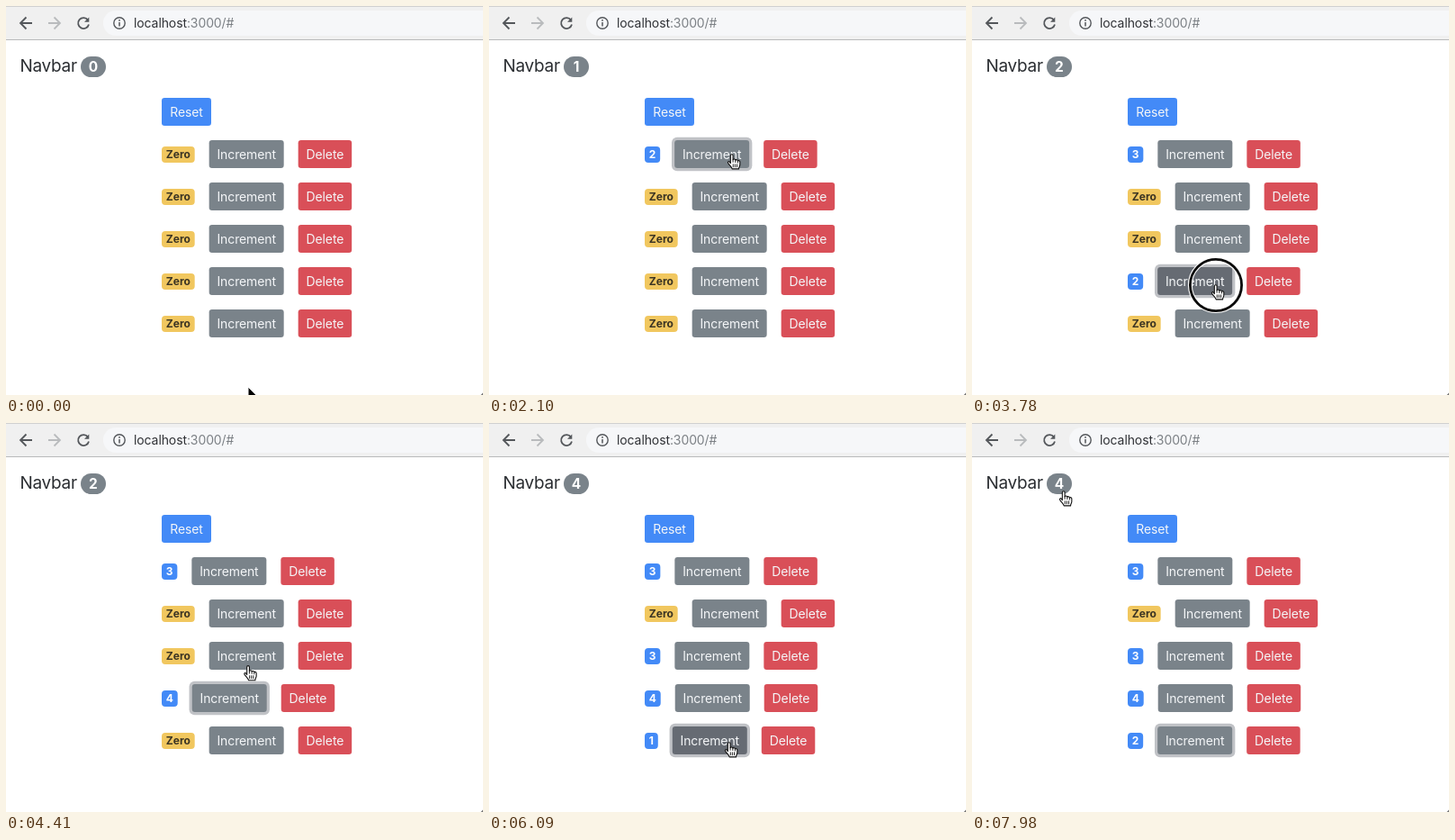
An HTML page that plays this animation: 530x432 px, repeating every 8000 ms.

```html
<!DOCTYPE html>
<html lang="en">
<head>
<meta charset="utf-8">
<title>Counters</title>
<style>
html, body { margin: 0; width: 100%; height: 100%; overflow: hidden; background: #fff; }
svg { display: block; width: 530px; height: 432px; font-family: Inter, Roboto, sans-serif; }
.btn { font-size: 14px; letter-spacing: -.12px; fill: #f4f6f8; text-anchor: middle; }
.tag { font-size: 12px; font-weight: 700; }
</style>
</head>
<body>
<svg viewBox="0 0 530 432">
  <rect width="530" height="432" fill="#fff"/>
  <rect width="530" height="38" fill="#f0f0f0"/>
  <path d="M530 5H122a14 14 0 0 0 0 28H530z" fill="#f6f7f9"/>
  <path d="M0 .5H530" stroke="#d0d0d0"/>
  <path d="M0 37.5H530" stroke="#b9babb"/>
  <g fill="none" stroke="#54575b" stroke-width="1.8">
    <path d="M29 19H16.5M22.5 12.5L16 19l6.5 6.5"/>
    <path d="M47 19H59.5M53.5 12.5L60 19l-6.5 6.5" stroke="#b9bbbd"/>
    <path d="M91 15.5A6 6 0 1 0 92 20.5"/>
    <path d="M92.3 12.5v5.3H87z" fill="#54575b" stroke="none"/>
    <circle cx="126" cy="19" r="6.2" stroke-width="1.4"/>
    <path d="M126 18v4.5M126 15v1.7" stroke-width="1.5"/>
  </g>
  <text x="142" y="24" font-size="14" letter-spacing="-.1" fill="#303236">localhost<tspan fill="#7c8085">:3000/#</tspan></text>
  <text x="15.5" y="73" font-size="19" letter-spacing="-.3" fill="#2a2d31">Navbar</text>
  <rect x="83" y="56" width="28" height="23" rx="11.5" fill="#7a838a"/>
  <text id="total" x="97" y="73" font-size="15.5" font-weight="700" fill="#fff" text-anchor="middle">0</text>
  <g id="page"></g>
  <g id="ring" fill="none">
    <circle r="28.6" stroke="#fff" stroke-width="5"/>
    <circle r="28.6" stroke="#0b0b0b" stroke-width="2.8"/>
  </g>
  <path id="arrow" d="M0 0V14.5L3.4 11.4 5.7 16.8 8.2 15.7 5.9 10.5H10.4z" fill="#000" stroke="#fff" stroke-linejoin="round"/>
  <g id="hand" stroke="#111" stroke-linejoin="round" stroke-linecap="round">
    <g transform="scale(.92)">
      <path d="M-1.8 10.5V1.3C-1.8-.7 1.2-.7 1.2 1.3V6.3C1.6 5 4 5.1 4.2 6.7 4.8 5.7 6.8 6 7 7.5 7.8 6.8 9.6 7.2 9.6 9V12.2C9.6 14 8.2 15 8.2 17.3H.2C0 15.3-2.5 13.5-4.6 10.4-5.6 8.8-3.9 7.6-2.8 9z" fill="#fff" stroke-width="1.2"/>
      <path d="M1.2 6.3V9M4.2 7V9.3M7 7.8V9.8M1.4 11.8V15M3.7 11.8V15M6 11.8V15" fill="none"/>
    </g>
  </g>
  <path d="M530 429.5V432H527.5z" fill="#777"/>
</svg>
<script>
const LOOP = 8000, STEP = 70, LEFT = 173, GAP = 16;
const INC_W = 83, DEL_W = 59.5, BTN_H = 31, RESET = -1;
const GREY = '#7a838a', GREY_DOWN = '#666b73', RED = '#d94f58';
const BLUE = '#438af7', BLUE_DOWN = '#2f70dc', YELLOW = '#f1c75f';

// The pointer travels to each stop, rests, then clicks at a steady beat.
const REST = 90, HOLD = .6, RING_DELAY = 40;
const START = { x: 269, y: 423 };
const STOPS = [
  { row: RESET, x: 200, y: 129, arrive: 540, travel: 540, clicks: 1, beat: 350 },
  { row: 0, x: 270, y: 165, arrive: 1410, travel: 570, clicks: 3, beat: 350 },
  { row: 3, x: 271, y: 310, arrive: 3130, travel: 667, clicks: 4, beat: 235 },
  { row: 2, x: 269, y: 262, arrive: 4530, travel: 400, clicks: 3, beat: 250 },
  { row: 4, x: 267, y: 355, arrive: 5445, travel: 180, clicks: 2, beat: 520 },
  { x: 102, y: 76, arrive: 7760, travel: 1110, clicks: 0 }
];

const $ = id => document.getElementById(id);
const page = $('page');

function make(parent, name, attrs, text = '') {
  const node = document.createElementNS('http://www.w3.org/2000/svg', name);
  set(node, attrs);
  node.textContent = text;
  return parent.appendChild(node);
}
function set(node, attrs) {
  for (const key in attrs) node.setAttribute(key, attrs[key]);
}
const show = (node, on) => set(node, { visibility: on ? 'visible' : 'hidden' });
const move = (node, x, y) => set(node, { transform: `translate(${x} ${y})` });

function button(label, y, width, fill, halo) {
  const g = make(page, 'g', {});
  const glow = make(g, 'rect', { x: -3.2, y: -3.2, width: width + 6.4, height: BTN_H + 6.4, rx: 6, fill: halo });
  const face = make(g, 'rect', { width, height: BTN_H, rx: 3.2, fill });
  make(g, 'text', { class: 'btn', x: width / 2, y: 20.8 }, label);
  const btn = {
    face, glow,
    place(x) { btn.x = x; move(g, x, y); },
    hit: p => inside(p, btn.x, y, width, BTN_H)
  };
  btn.place(LEFT);
  show(glow, false);
  return btn;
}

const reset = button('Reset', 102, 55, BLUE, '#a4c6fb');
const rows = [0, 1, 2, 3, 4].map(i => {
  const y = 149 + 47 * i;
  return {
    box: make(page, 'rect', { x: LEFT, y: y + 7, height: 18, rx: 4 }),
    tag: make(page, 'text', { class: 'tag', x: LEFT + 4.8, y: y + 20.2 }),
    inc: button('Increment', y, INC_W, GREY, '#c0c2c6'),
    del: button('Delete', y, DEL_W, RED, '#eeb0b4')
  };
});

const clamp = u => Math.min(1, Math.max(0, u));
const ease = u => u * u * u * (u * (6 * u - 15) + 10);
const inside = (p, x, y, w, h) => p.x >= x && p.x <= x + w && p.y >= y && p.y <= y + h;

function pointer(t) {
  let { x, y } = START;
  for (const s of STOPS) {
    const k = ease(clamp((t - s.arrive + s.travel) / s.travel));
    x += (s.x - x) * k;
    y += (s.y - y) * k;
  }
  return { x, y };
}

function clicksAt(t) {
  const state = { counts: rows.map(() => 0), focus: null, down: null, ring: false };
  for (const { row, arrive, clicks, beat } of STOPS) {
    for (let i = 0; i < clicks; i++) {
      const since = t - (arrive + REST + i * beat);
      if (since < 0) return state;
      state.focus = row;
      if (since < beat * HOLD) {
        state.down = row;
        state.ring = since >= RING_DELAY;
      } else if (row !== RESET) state.counts[row]++;
    }
  }
  return state;
}

function drawRow({ box, tag, inc, del }, n, focused, pressed) {
  tag.textContent = n || 'Zero';
  const width = tag.getComputedTextLength() + 9.6;
  set(tag, { fill: n ? '#fff' : '#3b3423' });
  set(box, { width, fill: n ? BLUE : YELLOW });
  inc.place(LEFT + width + GAP);
  del.place(inc.x + INC_W + GAP);
  show(inc.glow, focused);
  set(inc.face, { fill: pressed ? GREY_DOWN : GREY });
}

function draw(t) {
  const p = pointer(t), { counts, focus, down, ring } = clicksAt(t);
  show(reset.glow, focus === RESET);
  set(reset.face, { fill: down === RESET ? BLUE_DOWN : BLUE });
  rows.forEach((row, i) => drawRow(row, counts[i], focus === i, down === i));
  $('total').textContent = counts.filter(Boolean).length;

  const over = inside(p, 16, 48, 95, 37) || reset.hit(p) || rows.some(r => r.inc.hit(p) || r.del.hit(p));
  show($('ring'), ring);
  show($('arrow'), !over);
  show($('hand'), over);
  for (const id of ['ring', 'arrow', 'hand']) move($(id), p.x, p.y);
}

function frame() {
  const t = performance.now() % LOOP;
  draw(Math.floor(t / STEP) * STEP);
  requestAnimationFrame(frame);
}
frame();
</script>
</body>
</html>
```
